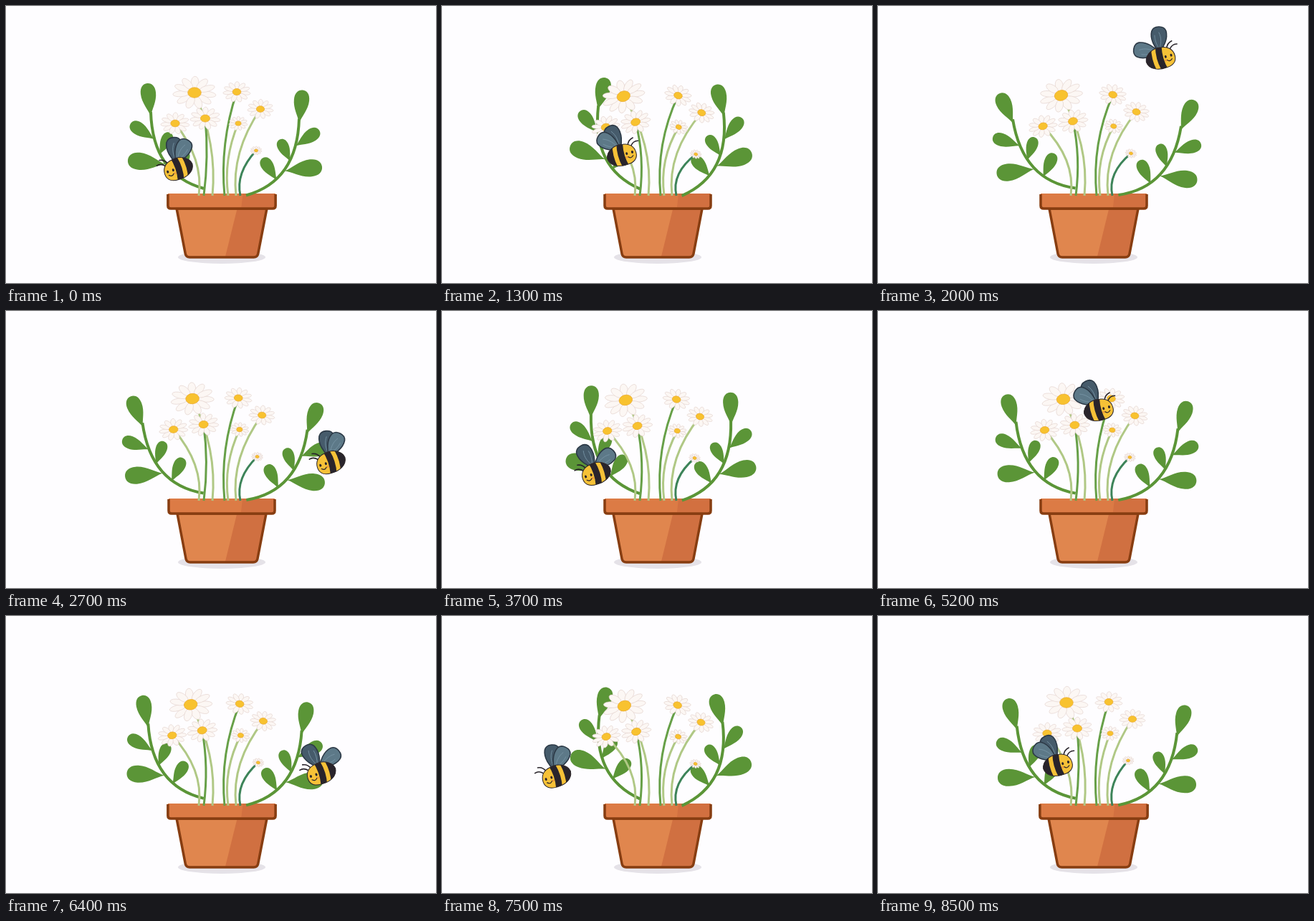
Write an HTML page with a canvas that moves like this. It is 600 px wide and 387 px high and loops after 8600 ms.

```html
<!DOCTYPE html>
<html lang="en">
<head>
<meta charset="utf-8">
<title>Flower pot and bee</title>
<style>
html, body { margin: 0; width: 100%; height: 100%; overflow: hidden; background: #fefdff; }
canvas { display: block; }
</style>
</head>
<body>
<canvas id="stage" width="600" height="387"></canvas>
<script>
const ctx = document.getElementById('stage').getContext('2d');
const LOOP = 8600, STEP = 100, BEE = 3600, PLANT = 3330, DAISY = 2830, TAU = Math.PI * 2;
const GREEN = '#5b9537', LIGHT = '#b0c885', MID = '#67a048', TEAL = '#3d8459';
const INK = '#29242b', YELLOW = '#f6c137';

// Flight waypoints: time, x, y
const flight = [
  [0, 240, 227], [600, 114, 217], [1300, 251, 208],
  [1600, 308, 138], [2050, 402, 74], [2700, 453, 211]
];
const daisies = [
  { x: 263, y: 121, size: 30, base: 288, color: LIGHT },
  { x: 278, y: 157, size: 21, base: 276, color: MID },
  { x: 236, y: 164, size: 20, base: 269, color: LIGHT },
  { x: 322, y: 120, size: 19, base: 305, color: MID },
  { x: 355, y: 144, size: 18, base: 321, color: LIGHT },
  { x: 324, y: 164, size: 13, base: 310, color: LIGHT },
  { x: 349, y: 202, size: 8, base: 327, color: TEAL }
];

// Smooth periodic curve through the waypoints.
function follow(points, period, t) {
  const n = points.length;
  const point = j => {
    const turn = Math.floor(j / n), [at, ...v] = points[j - turn * n];
    return { at: at + turn * period, v };
  };
  let i = n - 1;
  while (points[i][0] > t) i--;
  const [a, b, c, d] = [point(i - 1), point(i), point(i + 1), point(i + 2)];
  const span = c.at - b.at, p = (t - b.at) / span, p2 = p * p, p3 = p2 * p;
  return b.v.map((v, k) => {
    const m0 = (c.v[k] - a.v[k]) / (c.at - a.at) * span;
    const m1 = (d.v[k] - v) / (d.at - b.at) * span;
    return v * (2 * p3 - 3 * p2 + 1) + c.v[k] * (3 * p2 - 2 * p3) + m0 * (p3 - 2 * p2 + p) + m1 * (p3 - p2);
  });
}

// Plant lean in radians: a swing that starts gently and returns fast.
function leanAt(time) {
  const a = time / PLANT * TAU;
  return .4 * (Math.sin(a) - .3 * Math.sin(2 * a));
}

// Daisy sway: one swell plus a slow drift, then a restart.
function swayAt(time) {
  const p = time % DAISY / DAISY;
  return .45 * (1 - Math.cos(p * TAU)) + .3 * p;
}

function group(x, y, angle, draw) {
  ctx.save();
  ctx.translate(x, y);
  ctx.rotate(angle);
  draw();
  ctx.restore();
}

function paint(shape, fill, stroke, width = 1) {
  const path = typeof shape === 'string' ? new Path2D(shape) : shape;
  ctx.lineWidth = width;
  if (fill) { ctx.fillStyle = fill; ctx.fill(path); }
  if (stroke) { ctx.strokeStyle = stroke; ctx.stroke(path); }
}

function oval(x, y, rx, ry, fill, stroke, width, angle = 0) {
  const path = new Path2D();
  path.ellipse(x, y, rx, ry, angle, 0, TAU);
  paint(path, fill, stroke, width);
}

function pot(wide) {
  oval(301, 351, 61, 9, '#e5e2e8');
  ctx.save();
  ctx.translate(301, 0);
  ctx.scale(wide ? 1.015 : 1, 1);
  ctx.translate(-301, 0);
  const body = new Path2D('M239 283L251 346Q252 351 257 351H345Q350 351 351 346L363 283Z');
  paint(body, '#e0864e');
  ctx.save();
  ctx.clip(body);
  paint('M323 280L305 354H370V280Z', '#d07041');
  ctx.restore();
  paint(body, null, '#873d11', 3.5);
  paint('M227 262H375V279Q375 283 371 283H231Q227 283 227 279Z', '#dc7b45');
  paint('M330 262H374V281H328Z', '#d27040');
  paint('M227 263V279Q227 283 231 283H371Q375 283 375 279V263', null, '#873d11', 3.5);
  ctx.restore();
}

const leafShape = new Path2D('M0 0C.2-.05.42-.23.7-.23C.9-.23 1-.13 1 0C1 .13.9.23.7.23C.42.23.2.05 0 0Z');

function leaf(x, y, tipX, tipY, turn) {
  group(x, y, Math.atan2(tipY - y, tipX - x) + turn, () => {
    const size = Math.hypot(tipX - x, tipY - y);
    ctx.scale(size, size);
    paint(leafShape, GREEN);
  });
}

function plant(lean) {
  group(272, 258, lean * .38, () => {
    ctx.translate(-272, -258);
    paint('M276 255C240 245 204 218 202 148', null, GREEN, 4);
    leaf(202, 154, 197, 108, lean * .55);
    leaf(207, 186, 174, 164, lean * .4);
    leaf(222, 221, 170, 215, lean * .3);
    leaf(214, 208, 229, 177, 0);
    leaf(233, 234, 253, 203, 0);
  });
}

function daisy({ x, y, size, base, color }, sway) {
  const side = x < 300 ? -1 : 1;
  const headX = x + side * sway * (3.5 + size * .2), headY = y + sway * 5;
  const bendX = base - side * 7;
  paint(`M${base} 265Q${bendX} ${(y + 265) / 2} ${headX} ${headY}`, null, color, 3);
  group(headX, headY, side * sway * .3, () => {
    ctx.scale(size, size * .75);
    const petals = 11;
    for (let i = 0; i < petals; i++) {
      const a = (i * 4 % petals + .3) / petals * TAU;
      oval(Math.cos(a) * .63, Math.sin(a) * .63, .38, .18, '#fcf7f4', '#e2d0ca', .7 / size, a);
    }
    oval(0, 0, .31, .32, '#f8c22f', '#eba92b', .8 / size);
  });
}

function wing(angle, fill) {
  group(0, -8, angle, () => {
    paint('M0 0C-6-7-13-19-10-30C-7-38 7-38 10-30C13-19 6-7 0 0Z', fill, '#2c3946', 1.6);
    paint('M0-3C-3-12-4-20 0-28M0-5C4-12 6-18 6-24', null, '#7895a6', .8);
  });
}

function bee(time) {
  const phase = time % BEE;
  const [x, y] = follow(flight, BEE, phase);
  const right = phase > 550 && phase < 2450;
  const beat = Math.floor(phase / STEP) % 3 === 1;
  const spread = beat !== right;
  ctx.save();
  ctx.translate(x, y);
  if (right) ctx.scale(-1, 1);
  ctx.rotate(right ? .27 : -.32);
  ctx.lineCap = 'round';
  wing(spread ? -.25 : .2, '#465b6b');
  wing(spread ? 1.17 : .77, '#5d7988');
  paint('M-11-10Q-14-18-21-19M-15-8Q-20-15-27-13', null, INK, 1.6);
  const body = new Path2D('M-20 2C-20-8-13-13-5-14C7-17 20-10 21 0C20 11 8 16-4 15C-13 15-20 11-20 2Z');
  paint(body, YELLOW);
  ctx.save();
  ctx.clip(body);
  paint('M-6-18Q-1 0-6 18H3Q8 0 3-18ZM9-18Q14 0 9 18H25V-18Z', INK);
  ctx.restore();
  paint(body, null, INK, 1);
  oval(-15, 0, 1.5, 2, INK);
  oval(-7, 0, 1.5, 2, INK);
  oval(-6, 5, 2, 1.4, '#ee9b37');
  paint('M-15 5Q-11 9-8 5', null, INK, 1.2);
  ctx.restore();
}

function draw(time) {
  ctx.fillStyle = '#fefdff';
  ctx.fillRect(0, 0, 600, 387);
  pot(time % DAISY < 800);
  const lean = leanAt(time);
  plant(lean);
  ctx.save();
  ctx.translate(611, 9.5);
  ctx.scale(-1, 1);
  plant(lean);
  ctx.restore();
  const sway = swayAt(time);
  daisies.forEach(d => daisy(d, sway));
  bee(time);
}

const start = performance.now();
function tick() {
  const elapsed = (performance.now() - start) % LOOP;
  draw(Math.floor(elapsed / STEP) * STEP);
  requestAnimationFrame(tick);
}
tick();
</script>
</body>
</html>
```
